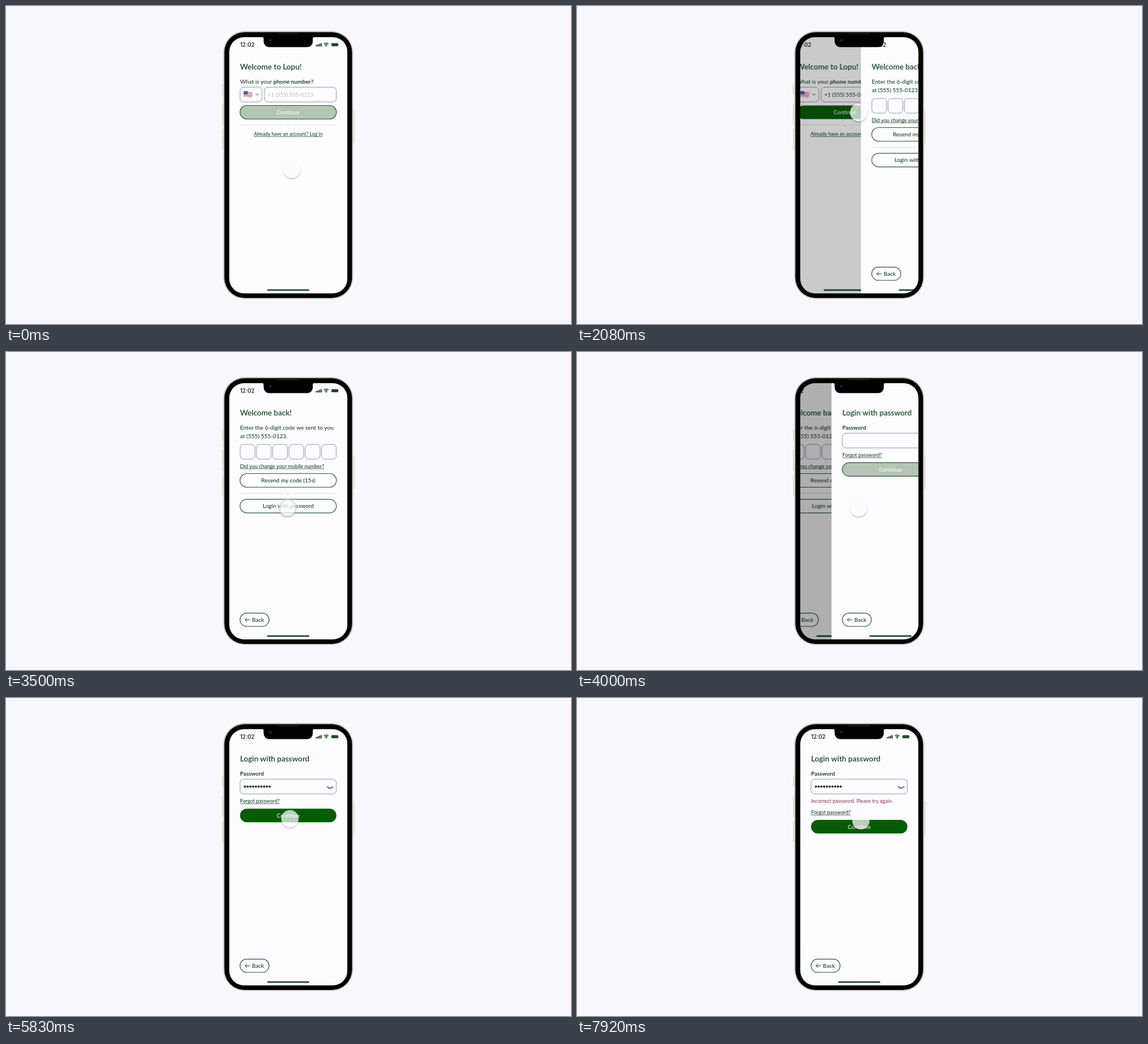
An HTML page with a canvas that plays this animation: 997 px wide and 561 px high, repeating every 8 s.

```html
<!DOCTYPE html>
<html lang="en">
<head>
<meta charset="utf-8">
<title>Login flow</title>
<style>
html, body { margin: 0; width: 100%; height: 100%; overflow: hidden; background: #f8f8fc; }
canvas { display: block; width: 997px; height: 561px; }
</style>
</head>
<body>
<canvas id="stage"></canvas>
<script>
const W = 997, H = 561, LOOP = 8000;
const dpr = window.devicePixelRatio || 1;
const INK = '#1f3f2d', TITLE = '#1b4429', GREEN = '#045d04', EDGE = '#8f93ac', PAPER = '#fdfdff';
const SCREEN = { x: 394, y: 55, w: 208.5, h: 452, r: 26 };

function setup(canvas) {
  canvas.width = W * dpr;
  canvas.height = H * dpr;
  const c = canvas.getContext('2d');
  c.scale(dpr, dpr);
  return c;
}
const stage = setup(document.getElementById('stage'));
let g = stage;

// ---------- drawing helpers ----------
function box(x, y, w, h, r, fill, stroke, width = 1) {
  g.beginPath();
  g.roundRect(x, y, w, h, r);
  if (fill) { g.fillStyle = fill; g.fill(); }
  if (stroke) { g.strokeStyle = stroke; g.lineWidth = width; g.stroke(); }
}

function disc(x, y, r, fill) {
  g.beginPath();
  g.arc(x, y, r, 0, 7);
  g.fillStyle = fill;
  g.fill();
}

function line(color, width, ...pts) {
  g.beginPath();
  pts.forEach(([x, y], i) => i ? g.lineTo(x, y) : g.moveTo(x, y));
  g.strokeStyle = color;
  g.lineWidth = width;
  g.lineCap = g.lineJoin = 'round';
  g.stroke();
}

function text(s, x, y, { size = 10.1, weight = 500, color = INK, align = 'left', face = 'Lato' } = {}) {
  g.font = `${weight} ${size}px ${face}, sans-serif`;
  g.textAlign = align;
  g.fillStyle = color;
  g.fillText(s, x, y);
  return g.measureText(s).width;
}

function link(s, x, y, size, align = 'left') {
  const w = text(s, x, y, { size, align });
  g.fillRect(align === 'center' ? x - w / 2 : x, y + 1.2, w, 0.7);
}

const title = s => text(s, 413, 111.8, { size: 13.5, weight: 600, color: TITLE });

function pill(label, y, fill, stroke, color) {
  box(413, y, 170, 24, 12, fill, stroke, 1.2);
  text(label, 498, y + 15.6, { color, align: 'center', size: 10 });
}
const outlined = (label, y) => pill(label, y, null, '#2d5736', INK);
function proceed(y, on) {
  if (on) pill('Continue', y, GREEN, null, '#f4faf4');
  else pill('Continue', y, '#b4c5b6', '#2f4f39', '#fbfdfb');
}

function divider(y) {
  line('#dddde3', 0.9, [413, y], [490, y]);
  line('#dddde3', 0.9, [506, y], [583, y]);
  text('or', 498, y + 1.8, { size: 6.5, color: '#c6c8cc', align: 'center' });
}

function backButton() {
  box(413, 460.6, 51.2, 23.4, 11.7, null, '#2d4f3c', 1.2);
  line(INK, 1, [430, 472.4], [422, 472.4]);
  line(INK, 1, [425.4, 469], [422, 472.4], [425.4, 475.8]);
  text('Back', 434, 476, { size: 10 });
}

function flag() {
  const x0 = 419.2, y0 = 150.8, w = 15.6, h = 10;
  g.save();
  g.beginPath();
  for (let i = 0; i <= 16; i++) g.lineTo(x0 + w * i / 16, y0 - 0.5 * Math.sin(i / 16 * 6.28));
  for (let i = 16; i >= 0; i--) g.lineTo(x0 + w * i / 16, y0 + h - 0.5 * Math.sin(i / 16 * 6.28));
  g.clip();
  for (let i = 0; i < 9; i++) {
    g.fillStyle = i % 2 ? '#f6eaec' : '#d8505c';
    g.fillRect(x0, y0 - 1 + i * 1.34, w, 1.4);
  }
  g.fillStyle = '#3d569c';
  g.fillRect(x0, y0 - 1, 7.4, 6.4);
  for (let i = 0; i < 6; i++) disc(x0 + 1.4 + i % 3 * 2.2, y0 + 1 + (i / 3 | 0) * 2.4, 0.4, '#dfe5f5');
  g.restore();
}

function closedEye(x, y) {
  g.beginPath();
  g.arc(x, y - 4, 5.6, 0.55, Math.PI - 0.55);
  g.strokeStyle = INK;
  g.lineWidth = 1.1;
  g.stroke();
  for (const a of [0.7, 1.25, 1.89, 2.44]) {
    const u = Math.cos(a), v = Math.sin(a);
    line(INK, 1, [x + u * 5.6, y - 4 + v * 5.6], [x + u * 7.6, y - 4 + v * 7.6]);
  }
}

function statusBar() {
  text('12:02', 413, 71.7, { size: 9.7, weight: 600, face: 'Inter', color: '#26332c' });
  for (let i = 0; i < 4; i++) box(546.6 + i * 2.8, 68.8 - i * 1.1, 2, 2.6 + i * 1.1, 0.6, '#22382b');
  g.strokeStyle = '#22382b';
  g.lineWidth = 1.3;
  g.lineCap = 'butt';
  for (const r of [3.5, 5.9]) {
    g.beginPath();
    g.arc(565, 71, r, -2.36, -0.78);
    g.stroke();
  }
  disc(565, 70.3, 1.2, '#22382b');
  box(574.2, 65.4, 12, 5.6, 1.6, '#1f4a25');
  box(586.8, 67.2, 0.9, 2, 0.4, '#6f8a75');
}

// ---------- app screens ----------
function phoneScreen(filled) {
  title('Welcome to Lopu!');
  const w = text('What is your ', 413, 136.6, { size: 10 });
  text('phone number?', 413 + w, 136.6, { size: 10.2, weight: 700 });
  box(413, 143.2, 38.8, 26, 6, null, EDGE);
  flag();
  line(INK, 1, [441, 155.2], [443.2, 157.4], [445.4, 155.2]);
  box(456, 143.2, 126.8, 26, 6, null, EDGE);
  text(filled ? '+1 (555) 555-0188' : '+1 (555) 555-0123', 462, 159.6,
    { size: 9.6, color: filled ? '#2b3a33' : '#bcbec6' });
  proceed(175.5, filled);
  divider(210);
  link('Already have an account? Log in', 498, 229, 8.6, 'center');
}

function codeScreen() {
  title('Welcome back!');
  text('Enter the 6-digit code we sent to you', 413, 137);
  text('at (555) 555-0123.', 413, 152);
  for (let i = 0; i < 6; i++) box(413.2 + i * 28.72, 163, 26, 26, 6, null, EDGE);
  link('Did you change your mobile number?', 413, 204.5, 9.05);
  outlined('Resend my code (15s)', 214.5);
  divider(249.5);
  outlined('Login with password', 259.8);
  backButton();
}

function passwordScreen(filled, wrong) {
  title('Login with password');
  text('Password', 413, 136.5, { size: 9.8, weight: 700 });
  box(413, 143.2, 169.8, 26, 6, null, EDGE);
  if (filled) for (let i = 0; i < 10; i++) disc(421.6 + i * 4.85, 156.2, 1.95, '#20382b');
  closedEye(572, 157);
  const drop = wrong ? 19.8 : 0;
  if (wrong) text('Incorrect password. Please try again.', 413, 185.2, { size: 9, color: '#8f3c66' });
  link('Forgot password?', 413, 185.2 + drop, 9);
  proceed(195.2 + drop, filled);
  backButton();
}

function render(draw, ...args) {
  const canvas = document.createElement('canvas');
  g = setup(canvas);
  g.fillStyle = PAPER;
  g.fillRect(SCREEN.x, SCREEN.y, SCREEN.w, SCREEN.h);
  statusBar();
  draw(...args);
  box(460.6, 499.8, 74.6, 2.6, 1.3, '#1d4a38');
  g = stage;
  return canvas;
}

const phoneEmpty = render(phoneScreen, false);
const phoneFilled = render(phoneScreen, true);
const code = render(codeScreen);
const passEmpty = render(passwordScreen, false);
const passFilled = render(passwordScreen, true);
const passWrong = render(passwordScreen, true, true);

// ---------- motion ----------
const span = (t, a, b) => Math.min(1, Math.max(0, (t - a) / (b - a)));
const inOut = p => p < 0.5 ? 2 * p * p : 1 - 2 * (1 - p) ** 2;
const settle = p => 1 - (1 - p) ** 2.5;
const move = (t, a, b) => inOut(span(t, a, b));

const steps = [
  { view: phoneFilled, from: 350, to: 650 },
  { view: code, from: 1950, to: 2510, push: true },
  { view: passEmpty, from: 3770, to: 4330, push: true },
  { view: passFilled, from: 4400, to: 4700 },
  { view: passWrong, from: 6230, to: 6560 }
];
const taps = [[1500, 1800], [3200, 3800], [5950, 6300]];

function layer(view, x = 0, alpha = 1) {
  g.globalAlpha = alpha;
  g.drawImage(view, x, 0, W, H);
  g.globalAlpha = 1;
}

function app(t) {
  let view = phoneEmpty;
  for (const s of steps) {
    const p = span(t, s.from, s.to);
    if (p === 1) { view = s.view; continue; }
    if (p === 0) break;
    if (s.push) {
      const q = settle(p);
      layer(view, -SCREEN.w * 0.25 * q);
      g.fillStyle = `rgba(0,0,0,${0.42 * q})`;
      g.fillRect(SCREEN.x, SCREEN.y, SCREEN.w, SCREEN.h);
      layer(s.view, SCREEN.w * (1 - q));
    } else {
      layer(view);
      layer(s.view, 0, inOut(p));
    }
    return;
  }
  layer(view);
}

function pointer(t) {
  const x = 504 - 7 * move(t, 1000, 1335) + 4 * move(t, 5000, 5317);
  const y = 288 - 100 * move(t, 700, 1335) + 87 * move(t, 2650, 3330)
    - 62 * move(t, 4650, 5317) + 3.5 * move(t, 7080, 7330);
  const r = 15.3;
  const press = Math.max(...taps.map(([a, b]) => span(t, a, a + 130) * (1 - span(t, b, b + 200))));
  g.save();
  g.beginPath();
  g.rect(0, 0, W, H);
  g.arc(x, y, r, 0, 7);
  g.clip('evenodd');
  g.shadowColor = 'rgba(0,0,0,0.26)';
  g.shadowBlur = 2.5 * dpr;
  g.shadowOffsetY = 1.8 * dpr;
  disc(x, y, r - 0.2, '#fff');
  g.restore();
  disc(x, y, r, 'rgba(253,253,255,0.73)');
  if (press > 0) {
    g.beginPath();
    g.arc(x, y, r - 1, 0, 7);
    g.strokeStyle = `rgba(120,120,135,${0.2 * press})`;
    g.lineWidth = 2.6;
    g.stroke();
  }
}

function shell() {
  const side = '#e6e4dc';
  box(380.6, 137, 4, 20, 1.2, side);
  box(380.6, 172, 4, 38, 1.2, side);
  box(380.6, 217, 4, 37, 1.2, side);
  box(611.4, 183, 3.8, 59, 1.2, side);
  box(383.2, 44, 229.6, 473, 38, '#d8d5cb');
  box(384.2, 45, 227.6, 471, 37, '#bdbab0');
  box(385.4, 46.2, 225.2, 468.8, 35.5, '#000');
}

function notch() {
  g.beginPath();
  g.moveTo(451.5, 54.5);
  g.quadraticCurveTo(454.6, 54.8, 454.6, 58);
  g.lineTo(454.6, 62);
  g.arcTo(454.6, 72.6, 466, 72.6, 10);
  g.lineTo(531, 72.6);
  g.arcTo(541.4, 72.6, 541.4, 62, 10);
  g.lineTo(541.4, 58);
  g.quadraticCurveTo(541.4, 54.8, 544.5, 54.5);
  g.fillStyle = '#000';
  g.fill();
  box(478.5, 47.8, 38.5, 2.2, 1.1, '#1c1c1c');
  disc(466.6, 60.6, 3.2, '#0c0c20');
  disc(466.6, 60.6, 1.5, '#24246a');
}

function frame(now) {
  const t = now % LOOP;
  g.fillStyle = '#f8f8fc';
  g.fillRect(0, 0, W, H);
  shell();
  g.save();
  g.beginPath();
  g.roundRect(SCREEN.x, SCREEN.y, SCREEN.w, SCREEN.h, SCREEN.r);
  g.clip();
  app(t);
  pointer(t);
  g.restore();
  notch();
  requestAnimationFrame(frame);
}
requestAnimationFrame(frame);
</script>
</body>
</html>
```
